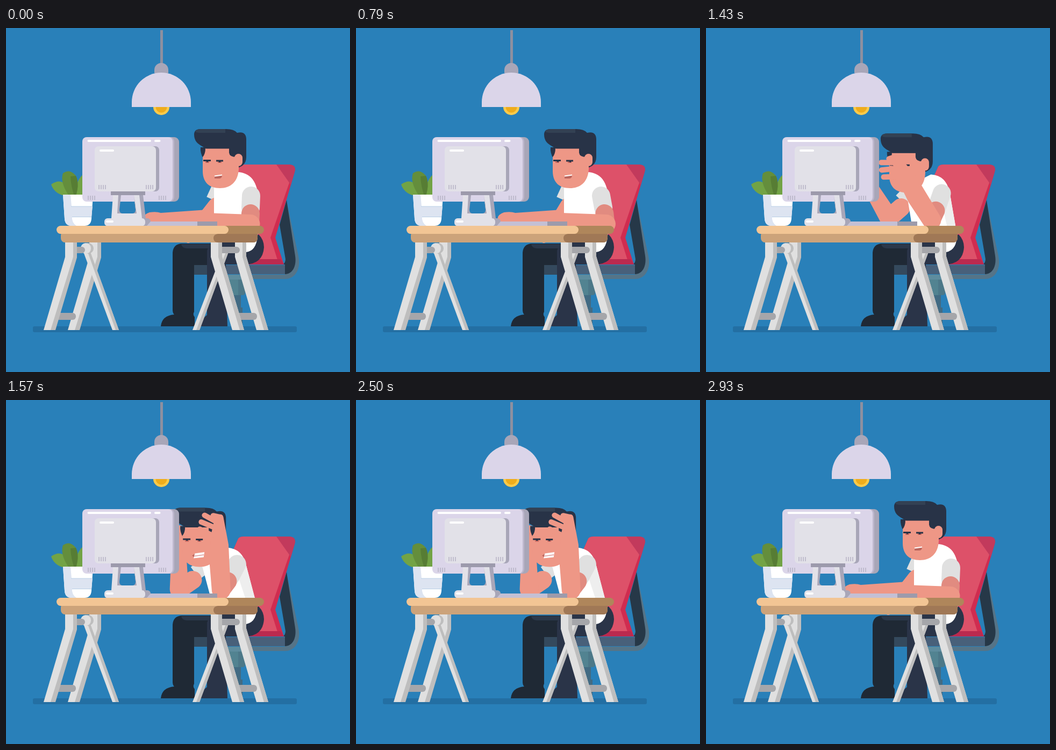
An HTML page for the animation above (3000 ms loop, 640x640 px).

```html
<!DOCTYPE html>
<html lang="en">
<head>
<meta charset="utf-8">
<title>Headache at the desk</title>
<style>
html, body { margin: 0; width: 100%; height: 100%; overflow: hidden; background: #2980b9 }
svg { display: block; width: 100vw; height: 100vh }
.skin { fill: #ee9786 } .skinLine { stroke: #ee9786 }
.hair { fill: #283347 } .light { fill: #e0e0e0 } .shade { fill: #bebebe } .metal { fill: #a5a6aa }
.lilac { fill: #dbd5e9 } .dusk { fill: #a8a6b8 } .pale { fill: #e2e1e8 }
.round { stroke-linecap: round; fill: none }
</style>
</head>
<body>
<svg viewBox="0 0 640 640">
<defs>
  <g id="post"><path class="light" d="M0 399H21V426L-19 562H-40L0 426Z"/><path class="shade" d="M15 399H22V427L-18 562H-27L15 426Z"/></g>
  <g id="postRight"><path class="light" d="M0 399H21V425L62 562H40L0 426Z"/><path class="shade" d="M14 399H21V425L62 562H54L14 426Z"/></g>
  <path id="vents" d="M0 0v8M4 0v8M8 0v8M12 0v8" stroke-width="1.6" fill="none"/>
</defs>

<rect x="50" y="555" width="491" height="11" rx="3" fill="#236fa3"/>

<!-- lamp -->
<path d="M289.500 4V68" stroke="#8d90a0" stroke-width="5"/>
<path class="dusk" d="M276 84V78a13 13 0 0 1 26 0V84Z"/>
<circle cx="289" cy="147" r="15" fill="#fccb4b"/><circle cx="289" cy="147" r="10.500" fill="#efad1c"/>
<path class="lilac" d="M234 147V138a55 55 0 0 1 110 0V147Z"/>

<!-- chair -->
<path d="M522 322L544 424C549 447 539 467 519 467H375V459H519Z" fill="#557488"/>
<path d="M509 366L522 320L538 424C541 443 533 458 519 458V440H515Q520 437 520 430Z" fill="#263848"/>
<path d="M311 441H380V459H311Z" fill="#34495d"/>
<path d="M380 441H519V458H380Z" fill="#48607a"/>
<path d="M413 459H445V492Q445 497 440 497H413Z" fill="#4c7888"/><path d="M413 459H432V497H413Z" fill="#528391"/><path d="M413 459H445V468H413Z" fill="#5e8c9e"/>
<path d="M424 497H437V520H440V555H424Z" fill="#426b83"/>
<path d="M432 258Q435 254 442 254H527Q541 255 537 268L501 390L517 440H400V330Z" fill="#d02c50"/>
<path d="M432 258Q435 254 442 254H514L527 288L492 390L505 431H400V330Z" fill="#dd5169"/>
<path d="M503 254H527Q541 255 537 268L530 292Z" fill="#c23a5c"/>
<path d="M440 430H511L517 440H440Z" fill="#ba2a4f"/>

<!-- legs -->
<path d="M327 401H400V441H350V528Q347 533 351 538V555H288Q290 535 313 533Q310 530 310 525V418Q311 402 327 401Z" fill="#1f2935"/>
<path d="M326 402H400V410H336Q327 409 326 402Z" fill="#2b384a"/>
<path d="M376 409H385V398H440L470 384Q480 394 480 408Q478 439 445 440H409L412 555H362Q363 541 374 534V414Z" fill="#2a3448"/>

<!-- man -->
<line id="farSleeve" stroke="#e0e0e0" stroke-width="28"/>
<line id="farUpper" class="skinLine round" stroke-width="34"/>
<path id="farArm" class="skin" d="M17 0L11 -86Q14 -94 12 -107Q8 -119 0 -119Q-13 -118 -14 -100L-18 0A17.500 17.500 0 0 0 17 0Z"/>
<path id="torso" fill="#fff"/>
<path id="torsoShade" fill="#eee"/>
<line id="nearSleeve" class="round" stroke="#e0e0e0" stroke-width="34"/>
<line id="nearUpper" class="round" stroke="#e18b80" stroke-width="34"/>
<g id="head">
  <path class="hair" d="M372 222H362Q361 232 367 243H374Z"/>
  <path class="hair" d="M362 188H410Q424 188 430 195Q446 191 447 206V240Q447 256 431 260L400 220H366Q350 214 350 198Q350 188 362 188Z"/>
  <path class="skin" d="M366 240Q371 234 371 224H433V262C432 286 418 298 398 298C378 298 366 287 366 266Z"/>
  <path class="hair" d="M360 217L372 224.500H415V232Q416 240 428 240L440 232V205H360Z"/>
  <path d="M352 192Q355 188 362 188H408V195H360Q354 195 352 192Z" fill="#334153"/>
  <rect class="skin" x="425" y="234" width="15" height="23" rx="7.500"/>
  <path d="M371 249.500h7M394 249.500h7" stroke="#c9685f" stroke-width="3"/>
  <path d="M367 246.500h14M391 247h13" stroke="#283347" stroke-width="3"/>
  <path id="pupils" d="M373 248.500h3M396 249h3" stroke="#283347" stroke-width="2"/>
  <g id="calm"><path d="M388 276L402 274Q402 280 396 280H388Z" fill="#b9655d"/><path d="M388 275.500L402 273.500" stroke="#fff" stroke-width="2"/></g>
  <g id="pain"><path d="M384 277L390 273V282Z" fill="#b9655d"/><path d="M389 273L407 270.500L405.500 280L387 282Z" fill="#fff"/><path d="M388 278L406 275.500" stroke="#d99" stroke-width="1.500"/></g>
</g>
<g id="nearArm">
  <path class="skin" d="M-18 2V-50L-12 -100L-4 -125Q2 -142 11 -139Q15 -138 15 -130L20 -82L17 0A17.500 17.500 0 0 1 -18 2Z"/>
  <path class="skinLine round" stroke-width="10" d="M9 -134L-4 -138M4 -124L-20 -140M0 -114L-27 -128M-10 -102L-31 -115"/>
</g>
<g id="bolts" fill="#fdd04e">
  <path d="M419 196L404 202.500L410.500 204L404 210.500L418 205L412 203Z"/>
  <path d="M399 197L396 203H400L399 208L403 201H400Z"/>
  <circle cx="412" cy="216" r="1"/>
</g>

<!-- plant -->
<path d="M84 291Q101 279 113 293L122 312H108Q89 307 84 291Z M130 312Q129 281 146 271V312Z" fill="#72a345"/>
<path d="M106 270Q119 261 130 275Q137 290 130 312H117Q100 287 106 270Z" fill="#648e3c"/>
<path d="M120 276Q121 296 127 312H130Q137 290 130 275Z" fill="#577d34"/>
<path d="M106 310H162L159 355Q158 368 146 368H122Q110 368 109 355Z" fill="#fff"/>
<path d="M106 310H120L122 332H161L159 351H123Q122 362 131 368H122Q110 368 109 355Z" fill="#dde4f1"/>
<path d="M121 332H161M123 351.500H159" stroke="#b9cfe6"/>

<!-- monitor -->
<rect class="dusk" x="280" y="203" width="42" height="120" rx="9"/>
<rect x="270" y="203" width="43" height="120" rx="8" fill="#bdb7cd"/>
<rect class="lilac" x="142" y="203" width="168" height="120" rx="8"/>
<rect class="dusk" x="180" y="220" width="105" height="84" rx="7"/>
<rect class="pale" x="165" y="220" width="114" height="84" rx="7"/>
<path class="pale" d="M199 311H212L208 345H242L238 311H251L255 354H196Z"/>
<path class="dusk" d="M248 311H255L260 354H253ZM209 311H214L211 338Q211 344 216 345H207ZM238 311L241 338Q241 344 236 345H243Z"/>
<rect class="dusk" x="195" y="354" width="74" height="14" rx="6"/>
<rect class="pale" x="183" y="354" width="76" height="14.500" rx="6"/>
<path d="M195 304H259V311H195Z" fill="#9c9aac"/>
<path class="round" d="M153.500 210H268M278 210H285.500M176 228H199M188 360H198" stroke="#fff" stroke-width="4"/>
<g stroke="#b8b5c6"><use href="#vents" x="173" y="292"/><use href="#vents" x="261" y="292"/><use href="#vents" x="153" y="312"/><use href="#vents" x="285" y="312"/></g>

<!-- desk -->
<path d="M269 360H356V368H262Z" fill="#c4c0d4"/><path d="M356 360H393V368H356Z" fill="#9d9bab"/>
<use href="#post" x="155"/>
<path class="light" d="M143 414H156L210 562H198Z"/><path class="shade" d="M151 414H156L210 562H204Z"/>
<rect class="shade" x="143" y="400" width="20" height="20" rx="10"/><rect class="light" x="139" y="400" width="19" height="20" rx="9.500"/>
<rect class="metal" x="122" y="407" width="25" height="12" rx="6"/><rect class="metal" x="90" y="530" width="40" height="13" rx="6"/>
<use href="#post" x="110"/>
<path class="light" d="M404 414H415L360 562H347Z"/><path class="shade" d="M410 414H415L360 562H354Z"/>
<use href="#postRight" x="426"/>
<rect class="metal" x="395" y="407" width="40" height="12" rx="6"/><rect class="metal" x="426" y="530" width="41" height="13" rx="6"/>
<use href="#postRight" x="381"/>
<rect x="102" y="378" width="366" height="21" rx="8" fill="#cca37a"/>
<path d="M468 383V391Q467 399 460 399H394Q386 398 386 391Q386 384 394 383Z" fill="#a07856"/>
<rect x="380" y="368" width="100" height="15" rx="7.500" fill="#af865b"/>
<rect x="94" y="368" width="320" height="15" rx="7.500" fill="#f2c594"/>
</svg>
<script>
const FRAMES = 42, LOOP = 3000;
const el = id => document.getElementById(id);
const set = (id, attrs) => { for (const k in attrs) el(id).setAttribute(k, attrs[k]); };
const show = (id, on) => set(id, { visibility: on ? 'visible' : 'hidden' });
const ease = p => { p = Math.min(1, Math.max(0, p)); return p * p * (3 - 2 * p); };
const swing = f => 17 * (Math.cos((f - 3.15) * Math.PI / 5) - Math.cos(3.15 * Math.PI / 5));

const torso = ['M387 280L430 268C455 269 468 285 470 320L468 388Q465 415 447 417L436 385L387 380Z',
               'M363 305L412 275C430 277 440 286 445 303L466 380Q469 412 447 417L436 385L384 380Z'];
const torsoShade = ['M470 320L468 388L455 388L455 325Z', 'M445 303L466 380L449 380L430 325Z'];

function draw(frame) {
  const u = frame < 34 ? ease((frame - 16) / 6.7) : 1 - ease((frame - 34.3) / 6.7);
  const sway = swing(frame > 30 ? 0 : Math.min(frame, 16)) * (1 - u);
  const mix = (a, b) => a + (b - a) * u;
  const morph = (id, [a, b]) => {
    const ends = b.match(/\d+/g);
    let i = 0;
    set(id, { d: a.replace(/\d+/g, n => mix(+n, +ends[i++])) });
  };
  const line = (id, x1, y1, x2, y2) => set(id, { x1, y1, x2, y2 });
  const arm = (id, x, y, angle) => set(id, { transform: `translate(${x} ${y}) rotate(${angle})` });

  const farX = mix(374, 321) + sway * .8, farY = mix(355, 352);
  line('farSleeve', mix(397, 372), mix(296, 307), mix(386, 351), mix(320, 322));
  line('farUpper', farX, farY, mix(392, 346) + sway * .4, mix(332, 335));
  arm('farArm', farX, farY, mix(-90, 3));

  morph('torso', torso);
  morph('torsoShade', torsoShade);

  const nearX = mix(454, 399) + sway, nearY = mix(364, 352);
  line('nearSleeve', mix(456, 429), mix(312, 305), mix(455, 416) + sway * .5, mix(335, 329));
  line('nearUpper', mix(455, 411) + sway * .7, mix(345, 337), nearX, nearY);
  arm('nearArm', nearX, nearY, mix(-90, -2));

  set('head', { transform: `translate(${mix(0, -39)} ${mix(0, 13)})` });
  set('pupils', { transform: `translate(${sway * .1} 0)` });
  show('calm', u < .5);
  show('pain', u >= .5);

  const size = Math.sin((frame - 24) * Math.PI / 7);
  show('bolts', frame > 24 && frame < 31);
  set('bolts', { transform: `translate(400 208) scale(${size}) translate(-400 -208)` });
}

function tick() {
  draw(Math.floor(performance.now() % LOOP * FRAMES / LOOP + .1) % FRAMES);
  requestAnimationFrame(tick);
}
tick();
</script>
</body>
</html>
```
